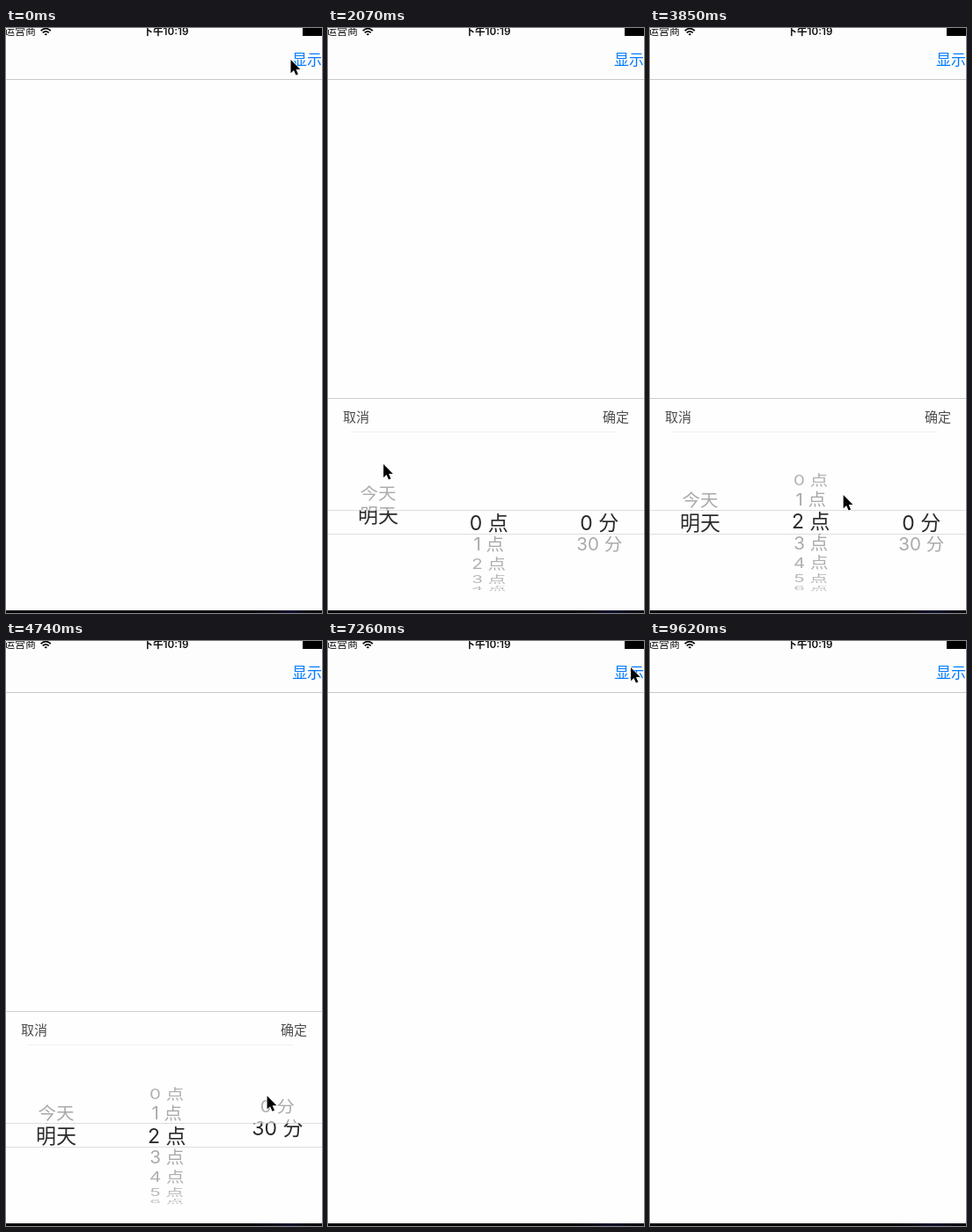
Recreate the animation shown at these times as an HTML page. Size 359 by 664 pixels, loop 9.98 s.

```html
<!DOCTYPE html>
<html lang="zh-CN">
<head>
<meta charset="utf-8">
<title>时间选择器</title>
<style>
  html, body { margin: 0; width: 100%; height: 100%; overflow: hidden; background: #fefefe; }
  svg { display: block; width: 359px; height: 664px; }
  text { font-family: Inter, "Noto Sans CJK SC", "Noto Sans CJK JP", "Noto Sans CJK", sans-serif; }
</style>
</head>
<body>
<svg viewBox="0 0 359 664">
  <defs>
    <clipPath id="band"><rect y="547.5" width="359" height="27"/></clipPath>
    <clipPath id="rest"><path d="M0 480H359V547H0ZM0 575H359V640.5H0Z"/></clipPath>
    <linearGradient id="strip">
      <stop offset=".78" stop-color="#000"/>
      <stop offset=".9" stop-color="#0b0b2c"/>
      <stop offset="1" stop-color="#000"/>
    </linearGradient>
  </defs>
  <rect width="359" height="664" fill="#fefefe"/>
  <rect width="359" height="58" fill="#fdfdfd"/>
  <rect y="58" width="359" height="1" fill="#c9c9c9"/>
  <text x="34" y="8.4" font-size="12" text-anchor="end" fill="#111">运营商</text>
  <g fill="none" stroke="#000" stroke-width="1.7">
    <path d="M39.6 3.2Q45.2 -2 50.8 3.2M41.7 5.4Q45.2 2.2 48.7 5.4"/>
    <path d="M45.2 8.6L43.4 6.9Q45.2 5.5 47 6.9Z" fill="#000" stroke="none"/>
  </g>
  <text x="181.3" y="8.3" font-size="11.7" font-weight="600" text-anchor="middle" fill="#111">下午10:19</text>
  <rect x="337" width="22" height="9" fill="#000"/>
  <text id="show" x="325" y="42.4" font-size="17" fill="#007aff">显示</text>

  <g id="panel">
    <rect y="420" width="359" height="244" fill="#fefefe"/>
    <rect y="420" width="359" height="1" fill="#cfcfcf"/>
    <rect x="25" y="458" width="302" height="1" fill="#f1f1f1"/>
    <g font-size="15" fill="#4c4c4c">
      <text x="17" y="446.7">取消</text>
      <text x="312" y="446.7">确定</text>
    </g>
    <rect y="547" width="359" height="1" fill="#dedede"/>
    <rect y="574" width="359" height="1" fill="#dedede"/>
    <g id="far" clip-path="url(#rest)" fill="#a9a9a9" font-size="20.5" text-anchor="middle"></g>
    <g id="near" clip-path="url(#band)" fill="#2a2a2a" font-size="23" text-anchor="middle"></g>
  </g>

  <rect y="661" width="359" height="3" fill="url(#strip)"/>
  <path id="cursor" d="M0 0V15.2L3.5 12L5.9 17.6L8.4 16.6L6 11.1H10.8Z" fill="#000" stroke="#fff" stroke-width="1.2" paint-order="stroke"/>
</svg>
<script>
const LOOP = 9980, TICK = 148, LAST = 65;
const MID = 561, RADIUS = 78, ANGLE = 0.325, ROW = 25;
const $ = id => document.getElementById(id);

const linear = p => p;
const easeOut = p => p * (2 - p);

// A move is [from tick, to tick, ...target]; values hold between moves.
const pointer = [
  [7, 8, 185.5, 396], [8, 11, 63, 539], [12, 14, 63, 495], [15, 19, 183.5, 588],
  [20, 24, 184, 515], [25, 28, 291, 560], [29, 33, 298.5, 501.5], [34, 36, 294, 565],
  [36, 38, 265, 480], [38, 39, 285, 391], [39, 41, 329.5, 438], [44, 49, 344, 30],
  [52, 56, 28.5, 438.5], [59, LAST, 165, 690]
];
const slide = [[2, 4, 0], [42, 43, 1], [50, 51, 0], [57, 59, 1]];
const wheels = [
  { x: 57, rows: ["今天", "明天"], moves: [[12, 14, 1.35], [15, 17, 1]] },
  { x: 182.7, rows: Array.from({ length: 24 }, (_, i) => i + " 点"), moves: [[20, 24, 2.2], [25, 27, 2]] },
  { x: 308.3, rows: ["0 分", "30 分"], moves: [[29, 33, 1.42], [34, 37, .1], [37, 43, 0]] }
];

function follow(moves, start, n, ease) {
  let pos = start;
  for (const [from, to, ...goal] of moves) {
    if (n <= from) break;
    const p = ease(Math.min(1, (n - from) / (to - from)));
    pos = pos.map((v, i) => v + (goal[i] - v) * p);
  }
  return pos;
}

function label(parent, str) {
  const el = document.createElementNS("http://www.w3.org/2000/svg", "text");
  el.textContent = str;
  el.setAttribute("y", ".37em");
  return $(parent).appendChild(el);
}

for (const w of wheels)
  w.cells = w.rows.map(s => ({ far: label("far", s), near: label("near", s) }));

function place(el, visible, x, y, squash) {
  el.style.display = visible ? "" : "none";
  if (visible) el.setAttribute("transform", `translate(${x} ${y}) scale(1 ${squash})`);
}

function turn(w, pos) {
  w.cells.forEach(({ far, near }, i) => {
    const k = i - pos, a = k * ANGLE;
    place(far, Math.abs(k) < 4.6, w.x, MID + RADIUS * Math.sin(a), Math.cos(a));
    far.setAttribute("opacity", 1.08 - .08 * Math.abs(k));
    place(near, Math.abs(k) < 1.2, w.x, MID + ROW * k, 1);
  });
}

function draw(t) {
  const n = Math.min(LAST, Math.floor((t % LOOP + 4) / TICK));
  const [x, y] = follow(pointer, [323.5, 36], n, linear);
  const [hidden] = follow(slide, [1], n, easeOut);
  $("cursor").setAttribute("transform", `translate(${x} ${y})`);
  $("panel").setAttribute("transform", `translate(0 ${hidden * 244})`);
  $("show").setAttribute("opacity", n === 2 || n === 50 ? .3 : 1);
  for (const w of wheels) turn(w, follow(w.moves, [0], n, easeOut)[0]);
}

const start = performance.now();
function frame() {
  draw(performance.now() - start);
  requestAnimationFrame(frame);
}
frame();
</script>
</body>
</html>
```
